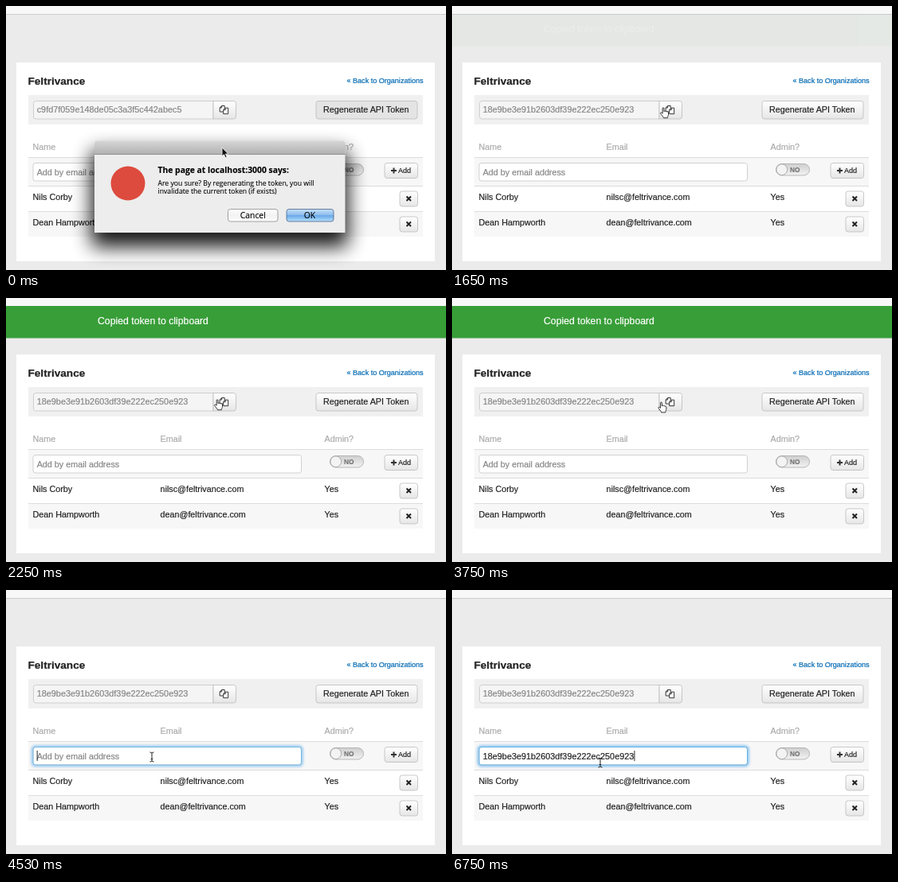
These frames come from a looping animation (552 px wide and 332 px high, 6870 ms). An HTML page:

```html
<!DOCTYPE html>
<html lang="en">
<head>
<meta charset="utf-8">
<title>Copy token</title>
<style>
  html, body { margin: 0; width: 100%; height: 100%; overflow: hidden; background: #ebebeb; }
  svg { display: block; width: 552px; height: 332px; }
  text {
    font: 10.78px "Liberation Sans", Arial, sans-serif; white-space: pre;
    color: #222; fill: currentColor; stroke: currentColor; stroke-width: .2;
  }
  .head { color: #aaa; }
  .soft { color: #858585; }
  .small { font-size: 9.05px; }
  .hex { font-size: 10.87px; }
  .dlg { font-family: "Open Sans", "Noto Sans", sans-serif; font-size: 10.36px; color: #000; stroke-width: .1; }
  .note { font-size: 8.68px; }
  .btn { fill: url(#face); stroke: #bcbcbc; stroke-width: .8; }
  .btn.hover { fill: #e4e4e4; }
  .line { stroke: #dcdcdc; }
</style>
</head>
<body>
<svg viewBox="0 0 552 332" xmlns="http://www.w3.org/2000/svg">
  <defs>
    <linearGradient id="face" x2="0" y2="1"><stop stop-color="#fff"/><stop offset="1" stop-color="#e6e6e6"/></linearGradient>
    <linearGradient id="bar" x2="0" y2="1"><stop stop-color="#d6d6d6"/><stop offset="1" stop-color="#b0b0b0"/></linearGradient>
    <linearGradient id="mac" x2="0" y2="1"><stop stop-color="#fff"/><stop offset=".5" stop-color="#f2f2f2"/><stop offset="1" stop-color="#fdfdfd"/></linearGradient>
    <linearGradient id="blue" x2="0" y2="1"><stop stop-color="#c4dff7"/><stop offset=".48" stop-color="#8dbdee"/><stop offset=".52" stop-color="#69a8e8"/><stop offset="1" stop-color="#b4e0fb"/></linearGradient>
    <linearGradient id="track" x2="0" y2="1"><stop stop-color="#cfcfcf"/><stop offset="1" stop-color="#f2f2f2"/></linearGradient>
    <filter id="shade" x="-20%" y="-50%" width="140%" height="200%"><feGaussianBlur stdDeviation="12"/></filter>
    <filter id="glow" x="-5%" y="-50%" width="110%" height="200%"><feGaussianBlur stdDeviation="1.6"/></filter>
  </defs>

  <rect width="552" height="332" fill="#ebebeb"/>
  <rect width="552" height="10" fill="#f8f8f8"/>
  <rect y="10" width="552" height="1" fill="#cdcdcd"/>
  <g id="banner">
    <rect y="10" width="552" height="40.5" fill="#389e38"/>
    <text x="115" y="33" style="font-size:12.26px;color:#fff">Copied token to clipboard</text>
  </g>

  <rect x="13" y="71" width="525" height="250" fill="#fff"/>
  <text x="27.5" y="99" style="font-size:13.6px;font-weight:bold">Feltrivance</text>
  <text x="427.5" y="97" class="small" style="color:#0069b4">« Back to Organizations</text>

  <rect x="28" y="112" width="495" height="37" fill="#f0f0f0"/>
  <path d="M260 119.5H37.5a3 3 0 0 0-3 3v16.5a3 3 0 0 0 3 3H260z" fill="#f5f5f5" stroke="#c6c6c6" stroke-width=".8"/>
  <text id="token" x="38.7" y="134" class="soft hex"></text>
  <path class="btn" d="M260 119.5h25.5a3 3 0 0 1 3 3v16.5a3 3 0 0 1-3 3H260z"/>
  <g fill="#fff" stroke="#333">
    <path d="M270.7 125.5h3.5v7.5h-6v-5z"/>
    <path d="M275.2 128.2h3.5v7.5h-6v-5z"/>
    <path d="M270.7 125.5v2.5h-2.5M275.2 128.2v2.5h-2.5" fill="none"/>
  </g>
  <rect id="regen" class="btn" x="389" y="119.5" width="127" height="22.5" rx="3"/>
  <text x="398" y="134.2">Regenerate API Token</text>

  <text x="33.5" y="181" class="head">Name</text>
  <text x="193.5" y="181" class="head">Email</text>
  <text x="399.5" y="181" class="head">Admin?</text>

  <rect x="28" y="191" width="495" height="36" fill="#f7f7f7"/>
  <rect x="28" y="259" width="495" height="31" fill="#f7f7f7"/>
  <path class="line" d="M28 190.5H523M28 226.5H523M28 258.5H523"/>

  <rect id="ring" x="33" y="196.5" width="338.5" height="24.5" rx="4" fill="none" stroke="#52a8ec" stroke-width="2.6" filter="url(#glow)"/>
  <rect x="34" y="197.5" width="336.5" height="22.5" rx="3" fill="#fff" stroke="#c6c6c6" stroke-width=".8"/>
  <rect id="edge" x="34" y="197.5" width="336.5" height="22.5" rx="3" fill="none" stroke="#5fb0e6"/>
  <text id="entry" x="38.7" y="212.5"></text>
  <rect id="caret" y="202" width=".9" height="13" fill="#111"/>

  <rect x="406.5" y="198.5" width="42" height="14.5" rx="7.25" fill="url(#track)" stroke="#a8a8a8" stroke-width=".8"/>
  <circle cx="413.8" cy="205.75" r="6.9" fill="#f3f3f3" stroke="#999" stroke-width=".8"/>
  <text x="424" y="208.7" style="font-size:8.3px;font-weight:bold;color:#777">NO</text>
  <rect class="btn" x="475" y="197.5" width="41.5" height="19" rx="3"/>
  <path d="M483 207h7M486.5 203.5v7" stroke="#333" stroke-width="2"/>
  <text x="492" y="210.3" class="small">Add</text>

  <text x="33.5" y="243.5">Nils Corby</text>
  <text x="193.5" y="243.5">nilsc@feltrivance.com</text>
  <text x="399.5" y="243.5">Yes</text>
  <text x="33.5" y="275.5">Dean Hampworth</text>
  <text x="193.5" y="275.5">dean@feltrivance.com</text>
  <text x="399.5" y="275.5">Yes</text>
  <g id="del">
    <rect class="btn" x="494" y="233" width="22.5" height="19" rx="3"/>
    <path d="M502.5 239.5l5.500 5.500m0-5.500l-5.500 5.500" stroke="#222" stroke-width="2"/>
  </g>
  <use href="#del" y="32"/>

  <g id="dialog">
    <rect x="107" y="182" width="322" height="121" rx="6" opacity=".9" filter="url(#shade)"/>
    <path d="M111 285V173.500a4 4 0 0 1 4-4H421.500a4 4 0 0 1 4 4V285z" fill="#ededed"/>
    <path d="M111 187V173.500a4 4 0 0 1 4-4H421.500a4 4 0 0 1 4 4V187z" fill="url(#bar)"/>
    <path d="M111 186.500H425.500" stroke="#888" stroke-width=".8"/>
    <circle cx="153" cy="223" r="21.5" fill="#dd4b3e"/>
    <text class="dlg" x="190.5" y="209.5" style="font-weight:bold">The page at localhost:3000 says:</text>
    <text class="dlg note" x="190.5" y="225.5">Are you sure? By regenerating the token, you will</text>
    <text class="dlg note" x="190.5" y="235.8">invalidate the current token (if exists)</text>
    <rect x="278.5" y="255.5" width="62.5" height="15.5" rx="3" fill="url(#mac)" stroke="#8c8c8c" stroke-width=".8"/>
    <rect x="352" y="255.5" width="59" height="15.5" rx="3" fill="url(#blue)" stroke="#4c6489" stroke-width=".8"/>
    <text class="dlg" x="309.8" y="266.8" text-anchor="middle">Cancel</text>
    <text class="dlg" x="381" y="266.8" text-anchor="middle">OK</text>
  </g>

  <g id="cursor">
    <path id="arrow" d="M0 0V11l2.500-2.300 1.700 4 1.900-.8-1.700-3.900H7.800z" fill="#111" stroke="#fff" stroke-width=".8"/>
    <path id="hand" transform="translate(-4 -.8)" fill="#fff" stroke="#222" stroke-width=".9"
      d="M3.200 8V1.600C3.200.3 5 .3 5 1.600V5.400C5.200 4.400 6.800 4.500 6.900 5.600 7.200 4.800 8.700 5 8.800 6 9.200 5.400 10.500 5.700 10.500 6.800V9C10.500 11 9.400 11.500 9.400 13.500H4.400C4 11.500 1.500 9.800.7 8 .3 6.900 1.600 6.300 2.200 7z"/>
    <path id="beam" d="M-2.500-6Q0-6 0-4.500 0-6 2.500-6M0-4.500V4.500M-2.500 6Q0 6 0 4.500 0 6 2.500 6M-1.300 2.500H1.300" fill="none" stroke="#222"/>
  </g>
</svg>
<script>
const LOOP = 6870;
const OLD = 'c9fd7f059e148de05c3a3f5c442abec5';
const NEW = '18e9be3e91b2603df39e222ec250e923';
const $ = id => document.getElementById(id);
const clamp = v => Math.max(0, Math.min(1, v));
const ramp = (t, start, len) => clamp((t - start) / len);
const swing = p => .5 - Math.cos(Math.PI * p) / 2;
const linear = p => p;
const out = p => 1 - (1 - p) * (1 - p);
const show = (id, on) => $(id).setAttribute('visibility', on ? 'visible' : 'hidden');
const fade = (id, v) => $(id).setAttribute('opacity', v);

// time, x, y, easing towards this point
const path = [
  [30, 271, 178], [600, 382, 262, swing], [720, 382, 262, linear],
  [1380, 265, 128, swing], [3749, 265, 128, linear], [3750, 262.5, 131, linear],
  [4140, 203, 201, linear], [4410, 183, 210, out],
  [5010, 183, 210, linear], [5400, 186, 217, swing]
];

function pointer(t) {
  const i = path.findIndex(k => k[0] > t);
  if (i === 0) return path[0].slice(1);
  if (i < 0) return path[path.length - 1].slice(1);
  const a = path[i - 1], b = path[i];
  const p = b[3]((t - a[0]) / (b[0] - a[0]));
  return [a[1] + (b[1] - a[1]) * p, a[2] + (b[2] - a[2]) * p];
}

function draw(t) {
  const open = t < 680, pasted = t >= 6000;
  const [x, y] = pointer(t);
  const inside = (l, r, top, bottom) => x >= l && x < r && y >= top && y < bottom;
  const onCopy = !open && inside(260, 289, 119, 142);
  const onField = !open && (inside(34, 371, 197, 221) || inside(34, 260, 119, 142));

  show('dialog', open);
  $('regen').classList.toggle('hover', open);
  $('token').textContent = t < 780 ? OLD : NEW;

  fade('banner', swing(ramp(t, 1590, 510)) - swing(ramp(t, 3780, 600)));

  const focus = out(ramp(t, 4440, 150));
  fade('ring', focus * .75);
  fade('edge', focus);
  $('entry').textContent = pasted ? NEW : 'Add by email address';
  $('entry').setAttribute('class', pasted ? 'hex' : 'soft');
  $('caret').setAttribute('x', pasted ? 228.5 : 38.7);
  show('caret', t >= 4470 && t < 5010 || t >= 5580);

  $('cursor').setAttribute('transform', `translate(${x.toFixed(2)} ${y.toFixed(2)})`);
  show('hand', onCopy);
  show('beam', onField);
  show('arrow', !onCopy && !onField);
}

const start = performance.now();
function tick() {
  draw((performance.now() - start) % LOOP);
  requestAnimationFrame(tick);
}
tick();
</script>
</body>
</html>
```
